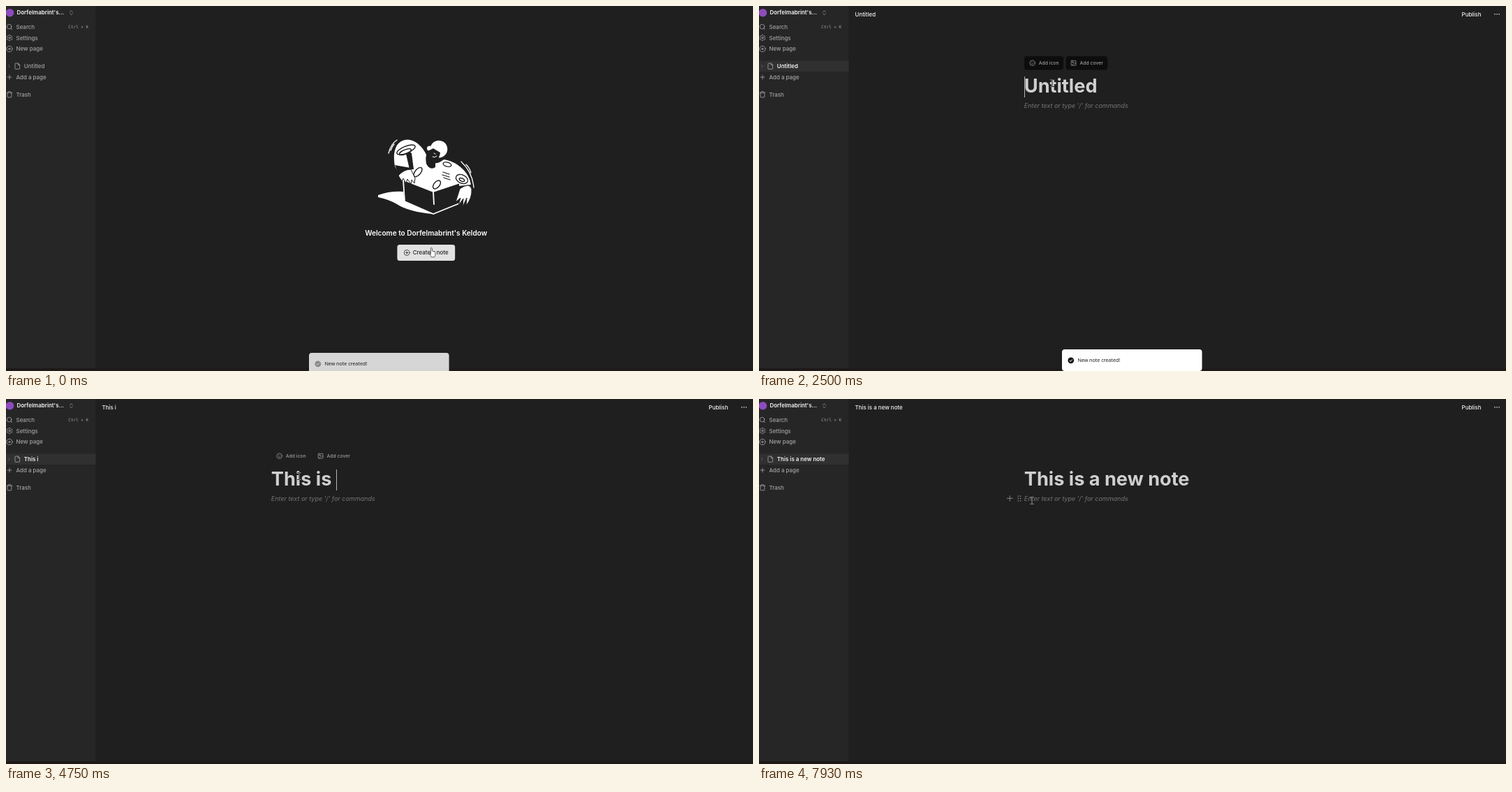
An HTML page for the animation above (7.99 s loop, 1070 by 523 pixels).

```html
<!DOCTYPE html>
<html lang="en">
<head>
<meta charset="utf-8">
<title>New note</title>
<style>
html, body { margin: 0; width: 100%; height: 100%; overflow: hidden; background: #1f1f1f; }
svg { display: block; width: 100vw; height: 100vh; }
text { font: 500 7.95px Inter, sans-serif; white-space: pre; }
.mute { fill: #a3a3a3; }
.lit { fill: #f4f4f4; }
.bold { font-weight: 600; }
.small { font-size: 6.8px; fill: #9c9c9c; }
.kbd { font: 6px "DejaVu Sans Mono", monospace; fill: #a3a3a3; }
.welcome { font-size: 10.1px; font-weight: 600; fill: #fff; }
.title { font-size: 27.15px; font-weight: 700; fill: #cfcfcf; }
.hint { font-size: 9px; font-weight: 400; font-style: italic; fill: #757575; }
.toast { font: 500 7.1px "Noto Sans", sans-serif; fill: #171717; }
.icon { fill: none; stroke-width: 2; stroke-linecap: round; stroke-linejoin: round; }
#beam { mix-blend-mode: difference; }
</style>
</head>
<body>
<svg id="stage" viewBox="0 0 1070 523"></svg>
<script>
const LOOP = 7990;
const OWNER = "Dorfelmabrint's";
const NOTE = "This is a new note";
const TYPED = [3820, 3950, 4150, 4320, 4380, 4610, 4680, 4750, 4840, 4910, 5050, 5180, 5450, 5500, 5720, 5850, 6040, 6170];
const SAVED = [4010, 4150, 4320, 4440, 4610, 4680, 4840, 4910, 5050, 5120, 5250, 5450, 5550, 5720, 5850, 6040, 6230, 6370];

const circle = (x, y, r, attrs = "") => `<circle cx="${x}" cy="${y}" r="${r}" ${attrs}/>`;
const path = (d, attrs = "") => `<path d="${d}" ${attrs}/>`;
const rect = (x, y, w, h, fill, r = 0, attrs = "") =>
  `<rect x="${x}" y="${y}" width="${w}" height="${h}" rx="${r}" fill="${fill}" ${attrs}/>`;
const text = (x, y, s, cls, attrs = "") => `<text x="${x}" y="${y}" class="${cls}" ${attrs}>${s}</text>`;
const group = (id, ...parts) => `<g id="${id}">${parts.join("")}</g>`;

const gear = "M" + Array.from({ length: 48 }, (_, i) => {
  const a = i * Math.PI / 24, r = 8.9 + 1.5 * Math.cos(6 * a);
  return `${(12 + r * Math.sin(a)).toFixed(1)} ${(12 - r * Math.cos(a)).toFixed(1)}`;
}).join("L") + "Z";

const ICONS = {
  search: circle(11, 11, 8) + path("m21 21-4.3-4.3"),
  gear: path(gear) + circle(12, 12, 3),
  add: circle(12, 12, 10) + path("M8 12h8M12 8v8"),
  plus: path("M5 12h14M12 5v14"),
  page: path("M14 2H6a2 2 0 0 0-2 2v16a2 2 0 0 0 2 2h12a2 2 0 0 0 2-2V8zM14 2v6h6"),
  trash: path("M3 6h18M19 6v14a2 2 0 0 1-2 2H7a2 2 0 0 1-2-2V6M8 6V4a2 2 0 0 1 2-2h4a2 2 0 0 1 2 2v2"),
  sort: path("m7 15 5 5 5-5M7 9l5-5 5 5"),
  right: path("m9 18 6-6-6-6"),
  smile: circle(12, 12, 10) + path("M8 14s1.5 2 4 2 4-2 4-2M9 9h.01M15 9h.01"),
  image: rect(3, 3, 18, 18, "none", 2) + circle(9, 9, 2) + path("m21 15-3.1-3.1a2 2 0 0 0-2.8 0L6 21"),
  more: [5, 12, 19].map(x => circle(x, 12, 0.7)).join("")
};
const icon = (name, x, y, size = 10, color = "#a3a3a3") =>
  `<g class="icon" stroke="${color}" transform="translate(${x - size / 2} ${y - size / 2}) scale(${size / 24})">${ICONS[name]}</g>`;
const item = (name, y, label) => icon(name, 5, y) + text(14.5, y + 2.9, label, "mute");

function drawing() {
  const ink = "#1f1f1f";
  const swirl = (x, y, rx, ry, turn) =>
    `<ellipse rx="${rx}" ry="${ry}" transform="translate(${x} ${y}) rotate(${turn})" fill="none" stroke="${ink}" stroke-width="1.4"/>`;
  const white = d => path(d, 'fill="#fff"');
  const dark = d => path(d, `fill="${ink}"`);
  const hand = d => path(d, `fill="#fff" stroke="${ink}" stroke-width="1" stroke-linejoin="round"`);
  const line = (d, w = 1.8, color = "#fff") =>
    path(d, `fill="none" stroke="${color}" stroke-width="${w}" stroke-linecap="round" stroke-linejoin="round"`);
  return [
    white("M533 271Q549 265 569 266L571 280L612 298Q577 295 560 284Q548 277 533 274Z"),
    white("M557 230C553 206 560 192 575 191.5C589 192 599 205 604 217Q612 232 627 220C645 222 664 238 666 256L648 258L612 266L569 249Z"),
    swirl(573, 206, 14, 5, -22), swirl(572, 209, 9, 3, -22), swirl(590, 238, 8, 4, -50),
    swirl(632, 227, 6, 3, 15), swirl(653, 248, 9, 6, 25), swirl(653, 249, 4, 2, 25), swirl(617, 256, 7, 4, -50),
    line("M626 238l9 3M625 242l10 3M627 246l9 3", 1.3, ink),
    dark("M573 212Q578 207 581 211L584 234L578 234Z"),
    dark("M557 228L580 232L583 244L564 246Z"),
    dark("M569 249L612 266L649 254L650 283L612 298L571 280Z"),
    line("M569 249L612 266L648 254M569 249L571 280L612 298L649 283M612 266L613 284"),
    hand("M562 243Q570 234 580 234L586 247L585 254L581 249L580 255L575 248L573 254L569 247L567 251Z"),
    hand("M650 262Q664 252 667 262Q668 275 659 286L660 275L654 288L655 276L648 286L651 275L644 281Z"),
    circle(620, 205, 12.3, 'fill="#fff"'),
    circle(606.5, 204, 3.5, 'fill="#fff"'),
    dark("M604 208L612 204L622 210Q621 219 615 221L615 231Q607 236 602 226Q600 216 604 208Z"),
    line("M613 211l2 1M611 216q3 2 6-1", 1),
    line("M548 211Q551 198 560 192M551 207Q553 201 556 198", 1.3),
    line("M652 223Q668 238 670 260M659 227Q664 232 666 239", 1.3)
  ].join("");
}

const stage = document.getElementById("stage");
stage.innerHTML = [
  rect(0, 0, 1070, 523, "#1f1f1f"),
  rect(0, 0, 128.5, 523, "#262626"),
  rect(0, 519, 1070, 4, "#1f191a"),

  circle(5.5, 9.7, 5.8, 'fill="#8e4bbd"'),
  text(15.5, 12.4, OWNER.slice(0, 15) + "...", "lit bold"),
  icon("sort", 93.5, 9.7, 9),
  item("search", 30, "Search"),
  text(89.3, 32, "Ctrl + K", "kbd"),
  item("gear", 45.6, "Settings"),
  item("add", 61.5, "New page"),
  rect(0, 78.5, 128.5, 15.5, "#303030", 0, 'id="active"'),
  icon("right", 4.5, 86.2, 8, "#777"),
  icon("page", 16.3, 86.2),
  text(25.8, 89, "Untitled", "mute", 'id="side"'),
  item("plus", 102, "Add a page"),
  item("trash", 126.7, "Trash"),

  group("home",
    drawing(),
    text(601.7, 328.7, `Welcome to ${OWNER} Keldow`, "welcome", 'text-anchor="middle"'),
    rect(560.4, 342, 82.8, 23, "#e2e2e2", 3.5),
    icon("add", 574.2, 353.5, 9.5, "#222"),
    text(582.8, 356.4, "Create a note", "", 'fill="#222"')),

  group("skeleton",
    rect(135, 2.5, 45.5, 20.5, "#272727", 3),
    rect(1046, 1.5, 22, 22.5, "#272727", 3),
    rect(128.5, 28.5, 939.5, 34, "#272727"),
    rect(367, 94, 243.7, 31.3, "#272727", 3),
    ...[390, 195, 292].map((w, i) => rect(367, 134.5 + 18 * i, w, 9, "#272727", 3))),

  group("editor",
    text(137.5, 14.7, "Untitled", "lit", 'id="head"'),
    text(1006.6, 14.7, "Publish", "lit"),
    icon("more", 1057, 11.8, 10.5, "#e5e5e5"),
    group("tools",
      group("plates",
        rect(380, 72, 56, 19.5, "#0d0d0d", 3.5),
        rect(439.7, 72, 59.5, 19.5, "#0d0d0d", 3.5)),
      icon("smile", 391.6, 81.7, 9),
      text(400.7, 84.1, "Add icon", "small"),
      icon("image", 450.6, 81.7, 9),
      text(459.6, 84.1, "Add cover", "small")),
    rect(380, 101, 106, 30, "#0078d7", 0, 'id="selection"'),
    text(379.8, 124, "Untitled", "title", 'id="title"'),
    rect(380, 101, 1, 30, "#b4b4b4", 0, 'id="caret"'),
    group("handles",
      icon("plus", 359.3, 142.4, 13, "#777"),
      ...[0, 1, 2, 3, 4, 5].map(i => circle(371.3 + 3.2 * (i % 2), 139.2 + 3.3 * (i >> 1), 0.9, 'fill="#777"'))),
    text(379.8, 145.8, "Enter text or type '/' for commands", "hint"),
    rect(380, 137, 1, 11, "#b4b4b4", 0, 'id="textCaret"')),

  group("toast",
    rect(434, 492, 200.6, 31, "#fff", 4),
    group("check",
      circle(446.8, 507.8, 4.4, 'fill="#171717"'),
      path("m444.8 507.9 1.4 1.4 2.6-2.8", 'fill="none" stroke="#fff"')),
    text(456.4, 510.4, "New note created!", "toast")),

  group("hand", path("M608.4 356V347.6q0-1.2 1-1.2t1 1.2V351q1.4-.4 1.7.6 1.4-.3 1.6.7 1.2-.2 1.2 1V356q0 2.2-1.2 3.8h-4.3q-1-2.2-2.9-4.5-.3-1.4 1.9.7Z",
    'fill="#fff" stroke="#222" stroke-width=".7"')),
  group("arrow", path("M0 0V9.2L2.2 7.3 3.7 10.6 5.2 9.9 3.7 6.7H6.6Z", 'fill="#fff" stroke="#111" stroke-width=".5"')),
  group("beam", path("M-2.7-5H-.6L0-4.5.6-5H2.7M0-4.5V4.5M-2.7 5H-.6L0 4.5.6 5H2.7", 'fill="none" stroke="#b4b4b4" stroke-width="1"'))
].join("");

const el = {};
stage.querySelectorAll("[id]").forEach(e => el[e.id] = e);
const show = (name, on) => el[name].style.display = on ? "" : "none";
const place = (name, x, y) => el[name].setAttribute("transform", `translate(${x} ${y})`);
const write = (name, s) => { if (el[name].textContent !== s) el[name].textContent = s; };
const between = (t, a, b) => t >= a && t < b;
const mix = (a, b, k) => a + (b - a) * k;
const typed = (times, t) => NOTE.slice(0, times.filter(x => x <= t).length) || "Untitled";
// Eased progress, advancing in equal steps.
const glide = (t, from, to, steps) => {
  const k = Math.min(steps, Math.max(0, Math.floor((t - from) / (to - from) * (steps - 1)) + 1)) / steps;
  return k * k * (3 - 2 * k);
};

function pointer(t) {
  const a = glide(t, 1630, 1990, 7), b = glide(t, 6780, 7190, 8);
  const x = mix(mix(610, 420, a), 391, b), y = mix(mix(352, 110.5, a), 145.5, b);
  const onText = a > 0.85;
  show("hand", t < 1220);
  show("arrow", t >= 1220 && !onText);
  show("beam", onText);
  place("arrow", x - 1.5, y - 5);
  place("beam", x, y);
  show("tools", onText && y < 132);
  show("handles", b > 0 && y >= 132);
}

function notice(t) {
  show("toast", t < 4010);
  const step = Math.min(3, Math.floor(t / 60));
  let drop = [5, 2.5, 1, 0][step], alpha = [0.82, 0.92, 0.97, 1][step];
  if (t >= 3880) [drop, alpha] = t < 3950 ? [9, 0.7] : [20, 0.3];
  place("toast", 0, drop);
  el.toast.style.opacity = alpha;
  el.check.style.opacity = [0.4, 0.65, 0.85, 1][step];
}

function draw(now) {
  const t = now % LOOP;
  show("home", t < 1220);
  show("skeleton", between(t, 1220, 1350));
  show("editor", t >= 1350);
  show("active", t >= 1220);
  el.side.setAttribute("class", t < 1220 ? "mute" : "lit bold");

  write("title", typed(TYPED, t));
  write("side", typed(SAVED, t).trimEnd());
  write("head", typed(SAVED, t).trimEnd());

  const selected = between(t, 3020, 3820);
  show("selection", selected);
  el.title.style.fill = selected ? "#fff" : "";
  show("plates", t < 3950);
  show("caret", between(t, 2500, 3020) || between(t, 3820, 6720));
  if (t >= 1350) {
    const chars = t < 2830 ? 0 : t < 3820 ? 2 : el.title.textContent.length;
    const x = chars ? el.title.getSubStringLength(0, chars) : 0;
    el.caret.setAttribute("x", Math.round(379.8 + x));
  }
  show("textCaret", between(t, 7250, 7760));
  pointer(t);
  notice(t);
  requestAnimationFrame(draw);
}
requestAnimationFrame(draw);
</script>
</body>
</html>
```
